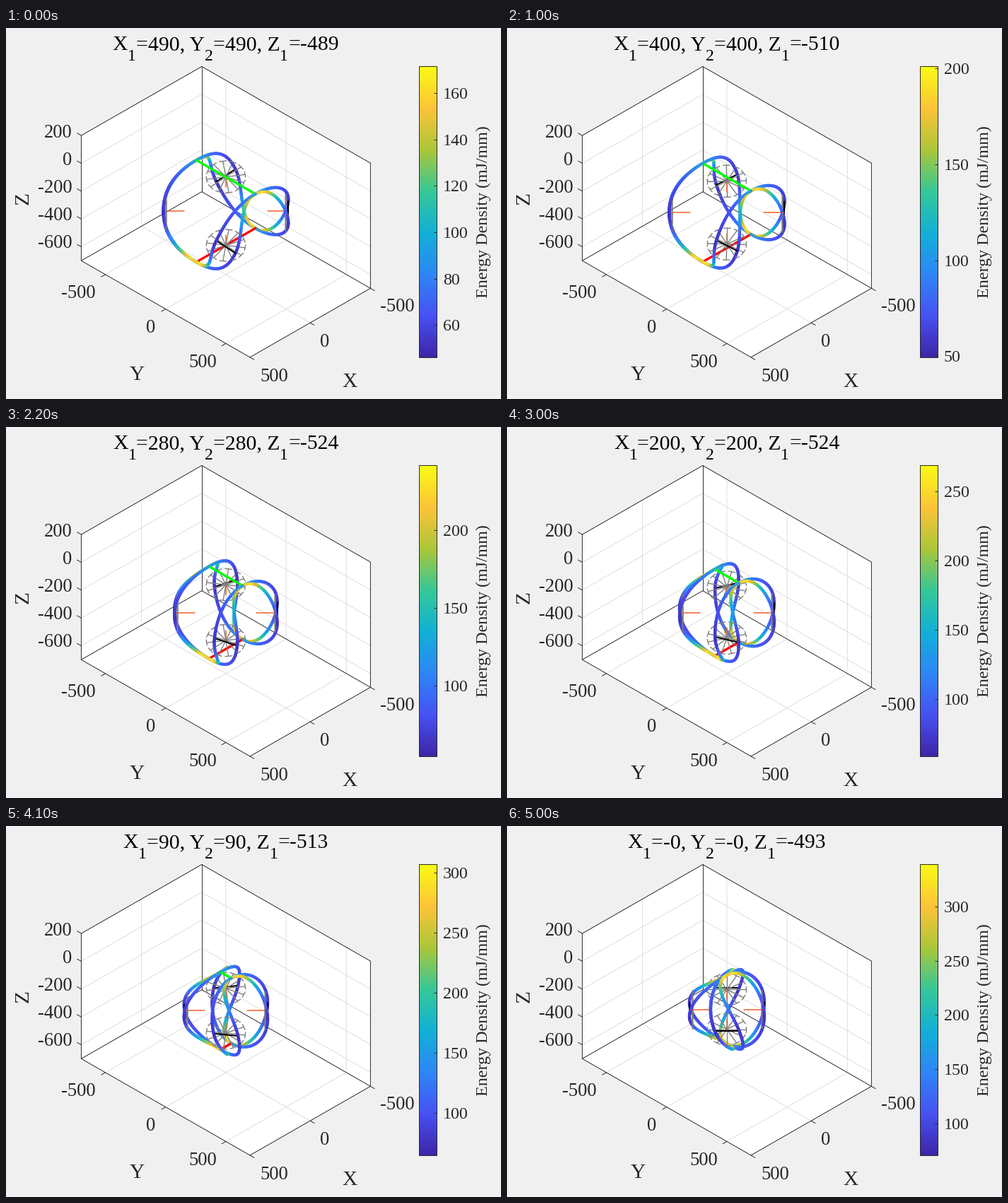
Animation, 700 px wide and 525 px high, one loop 5100 ms. Source, as a matplotlib script:

```python
import numpy as np
import matplotlib.pyplot as plt
from matplotlib.animation import FuncAnimation
from matplotlib.collections import LineCollection
from matplotlib.colors import LinearSegmentedColormap, to_rgba

W, H, DPI = 700, 525, 100
FRAMES, STEP_MS = 51, 100
PT = 72 / DPI
INK = "#262626"
TICK_SIZE, LABEL_SIZE, TITLE_SIZE, BAR_SIZE = 26.67, 29.33, 29.7, 24
BAR_L, BAR_R, BAR_T, BAR_B = 584.5, 609.5, 54.5, 466.5

PARULA = LinearSegmentedColormap.from_list("parula", [
    (0.242, 0.150, 0.660), (0.281, 0.323, 0.958), (0.179, 0.529, 0.968),
    (0.069, 0.695, 0.839), (0.216, 0.784, 0.592), (0.672, 0.779, 0.223),
    (0.997, 0.766, 0.220), (0.977, 0.984, 0.081)])

plt.rcParams["font.family"] = "Liberation Serif"

fig = plt.figure(figsize=(W / DPI, H / DPI), dpi=DPI, facecolor="#f0f0f0")
ax = fig.add_axes([0, 0, 1, 1])
ax.axis("off")


def project(p):
    """Orthographic view of world points, in pixels."""
    p = np.asarray(p, float)
    x, y, z = p[..., 0], p[..., 1], p[..., 2]
    return np.stack([311.2 + 0.1704 * (y - x),
                     211.1 + 0.0976 * (x + y) - 0.1969 * z], axis=-1)


def text(x, yc, s, size, ha="center"):
    """Text whose digits or capitals are centred on yc."""
    return ax.text(x, yc + 0.335 * size, s, fontsize=size * PT, ha=ha,
                   va="baseline", color=INK)


def vertical_text(base, yc, s, size):
    ax.text(base, yc, s, fontsize=size * PT, rotation=90, color=INK,
            rotation_mode="anchor", ha="center", va="baseline")


def lines(paths, color, width, z):
    ax.add_collection(LineCollection([project(p) for p in paths],
                                     colors=color, linewidths=width * PT,
                                     zorder=z, capstyle="butt"))


def draw_axes():
    x0, x1, y0, y1, z0, z1 = -500, 500, -700, 700, -700, 200
    outline = [(x0, y0, z1), (x1, y0, z1), (x1, y0, z0), (x1, y1, z0),
               (x0, y1, z0), (x0, y1, z1)]
    ax.add_patch(plt.Polygon(project(outline), fc="white", ec="none", zorder=0))

    grid = [[(0, y0, z1), (0, y0, z0), (0, y1, z0)]]
    grid += [[(x0, y, z1), (x0, y, z0), (x1, y, z0)] for y in (-500, 0, 500)]
    grid += [[(x1, y0, z), (x0, y0, z), (x0, y1, z)]
             for z in (0, -200, -400, -600)]
    lines(grid, "#dcdcdc", 0.9, 1)

    back = (x0, y0, z0)
    lines([outline + outline[:1], [back, (x0, y0, z1)],
           [back, (x1, y0, z0)], [back, (x0, y1, z0)]], INK, 0.95, 2)
    ticks = [[(x, y1, z0), (x, y1 + 36, z0)] for x in (-500, 0, 500)]
    ticks += [[(x1, y, z0), (x1 + 36, y, z0)] for y in (-500, 0, 500)]
    ticks += [[(x1, y0, z), (x1, y0 - 36, z)] for z in range(-600, 201, 200)]
    lines(ticks, INK, 0.95, 2)

    for k, v in enumerate(range(200, -601, -200)):
        text(93.5, 146.5 + 38.8 * k, str(v), TICK_SIZE, "right")
    for x, y, s in [(102.5, 373, "-500"), (204.5, 422, "0"), (279, 471, "500"),
                    (379.5, 491, "500"), (450.5, 442, "0"), (554, 392, "-500")]:
        text(x, y, s, TICK_SIZE)
    text(486.5, 498.5, "X", LABEL_SIZE)
    text(186, 488.5, "Y", LABEL_SIZE)
    vertical_text(31.5, 241, "Z", LABEL_SIZE)


def draw_colorbar():
    ax.imshow(np.linspace(1, 0, 256)[:, None], cmap=PARULA, aspect="auto",
              extent=[BAR_L, BAR_R, BAR_B, BAR_T], zorder=1)
    ax.add_patch(plt.Rectangle((BAR_L, BAR_T), BAR_R - BAR_L, BAR_B - BAR_T,
                               fc="none", ec=INK, lw=0.95 * PT, zorder=2))
    vertical_text(681, 260, "Energy Density (mJ/mm)", BAR_SIZE)


draw_axes()
draw_colorbar()
ax.set_xlim(0.3, W + 0.3)
ax.set_ylim(H + 0.1, 0.1)

model = LineCollection([], zorder=5, capstyle="round")
bar_ticks = LineCollection([], colors=INK, linewidths=0.95 * PT, zorder=3)
ax.add_collection(model)
ax.add_collection(bar_ticks)
bar_labels = [text(618, 0, "", BAR_SIZE, "left") for _ in range(9)]
# Odd parts of the title are subscripts.
title = [ax.text(0, 46 if k % 2 else 31.5, "", color="black", va="baseline",
                 fontsize=TITLE_SIZE * (0.8 if k % 2 else 1) * PT)
         for k in range(7)]


# ---- linkage model; z is measured from the mid plane until projected ----

UP = np.array([0, 0, 1.0])
ALONG = np.array([1, 1, 0]) / np.sqrt(2)
INWARD = np.array([-1, 1, 0]) / np.sqrt(2)
SIGNS = [(1, 1), (-1, 1), (1, -1), (-1, -1)]
ENERGY_S = [0, 0.1, 0.3, 0.5, 0.75, 1]
ENERGY_WIDE = [0.38, 0.33, 0.22, 0.15, 0.10, 0.05]
ENERGY_TIGHT = [0.86, 0.95, 0.66, 0.38, 0.15, 0.03]


def hermite(p0, t0, p1, t1, n=24):
    s = np.linspace(0, 1, n + 1)[:, None]
    return ((2 * s**3 - 3 * s**2 + 1) * p0 + (s**3 - 2 * s**2 + s) * t0
            + (3 * s**2 - 2 * s**3) * p1 + (s**3 - s**2) * t1)


def span(a, b, n=1):
    return np.linspace(a, b, n + 1)


def image(p, sx, sy, swap=False):
    """Mirror a path, optionally turned over onto the lower joints."""
    q = p * [sx, sy, 1]
    return q[:, [1, 0, 2]] * [1, 1, -1] if swap else q


def build(gap, depth):
    """Depth-sorted segments with colours and widths."""
    h = -depth / 2
    segs, cols, widths = [], [], []

    def add(path, color, width):
        n = len(path) - 1
        segs.append(np.stack([path[:-1], path[1:]], axis=1))
        cols.append(np.broadcast_to(color, (n, 4)))
        widths.append(np.full(n, width))

    r = 144 + 0.2 * gap + 2.5e-5 * gap**2
    turn = np.radians(0.079 * gap)
    lean = turn - np.radians(17)
    hub = np.array([r, -r, 0])
    outer = hub - 16 * INWARD
    arm = 72 * (np.cos(turn) * ALONG + np.sin(turn) * UP)
    apex = np.array([0, -gap / 2, h])
    start = np.array([440.0, 0, 0])
    end = 440 * (np.sin(lean) * ALONG - np.cos(lean) * UP)

    mid = (np.arange(24) + 0.5) / 24
    for tip, energy in ((outer + arm, ENERGY_WIDE), (outer - arm, ENERGY_TIGHT)):
        rod = hermite(apex, start, tip, end)
        color = PARULA(np.interp(mid, ENERGY_S, energy))
        for swap in (False, True):
            for sx, sy in SIGNS:
                add(image(rod, sx, sy, swap), color, 4.4)

    gray = to_rgba("#7f7f7f")
    for sx, sy in SIGNS:
        for a in turn + np.arange(12) * np.pi / 6:
            out = np.cos(a) * ALONG + np.sin(a) * UP
            side = np.cos(a) * UP - np.sin(a) * ALONG
            rim = hub + 114 * out
            add(image(span(hub, rim), sx, sy), gray, 1.4)
            add(image(span(rim - 20 * side, rim + 20 * side), sx, sy), gray, 1.4)
        add(image(span(hub, hub + 105 * INWARD, 4), sx, sy),
            to_rgba("#f0642b"), 1.5)
        add(image(span(outer - arm, outer + arm, 4), sx, sy),
            to_rgba("black"), 2)

    if gap:
        joint = span(apex, apex * [1, -1, 1], 24)
        add(joint, to_rgba("#00ff00"), 3.2)
        add(image(joint, 1, 1, True), to_rgba("#ff0000"), 3.2)

    segs, cols, widths = map(np.concatenate, (segs, cols, widths))
    near = (segs @ [0.58, 0.58, 0.573]).mean(axis=1)
    order = np.argsort(near, kind="stable")
    segs = segs[order] - [0, 0, h]
    return project(segs), cols[order], widths[order] * PT


def multiples(lo, hi, step):
    return np.arange(np.ceil(lo / step), np.floor(hi / step) + 1) * step


def pick_ticks(lo, hi):
    fine, coarse = multiples(lo, hi, 20), multiples(lo, hi, 50)
    if len(fine) > 9 or np.ptp(coarse) > np.ptp(fine):
        return coarse
    return fine


def set_colorbar(lo, hi):
    ticks = pick_ticks(lo, hi)
    ys = BAR_B - (ticks - lo) / (hi - lo) * (BAR_B - BAR_T)
    bar_ticks.set_segments([[(BAR_R - 4.5, y), (BAR_R, y)] for y in ys])
    for k, label in enumerate(bar_labels):
        label.set_visible(k < len(ticks))
        if k < len(ticks):
            label.set_text(f"{ticks[k]:.0f}")
            label.set_y(ys[k] + 0.335 * BAR_SIZE)


def set_title(gap, depth):
    g = str(gap) if gap else "-0"
    parts = ["X", "1", f"={g}, Y", "2", f"={g}, Z", "1", f"={depth:.0f}"]
    for t, s in zip(title, parts):
        t.set_text(s)
    renderer = fig.canvas.get_renderer()
    sizes = [t.get_window_extent(renderer).width for t in title]
    x = 311 - sum(sizes) / 2
    for t, w in zip(title, sizes):
        t.set_x(x)
        x += w


def update(i):
    gap = 500 - 10 * max(i, 1)
    depth = -525 + 5.66e-4 * (gap - 237.8)**2
    segs, cols, widths = build(gap, depth)
    model.set_segments(segs)
    model.set_color(cols)
    model.set_linewidths(widths)
    set_colorbar(70.3 - 0.066 * gap + 3.3e-5 * gap**2,
                 338.8 - 0.357 * gap + 3.2e-5 * gap**2)
    set_title(gap, depth)
    return []


anim = FuncAnimation(fig, update, frames=FRAMES, interval=STEP_MS,
                     repeat=True, repeat_delay=0, blit=False)
plt.show()
```
